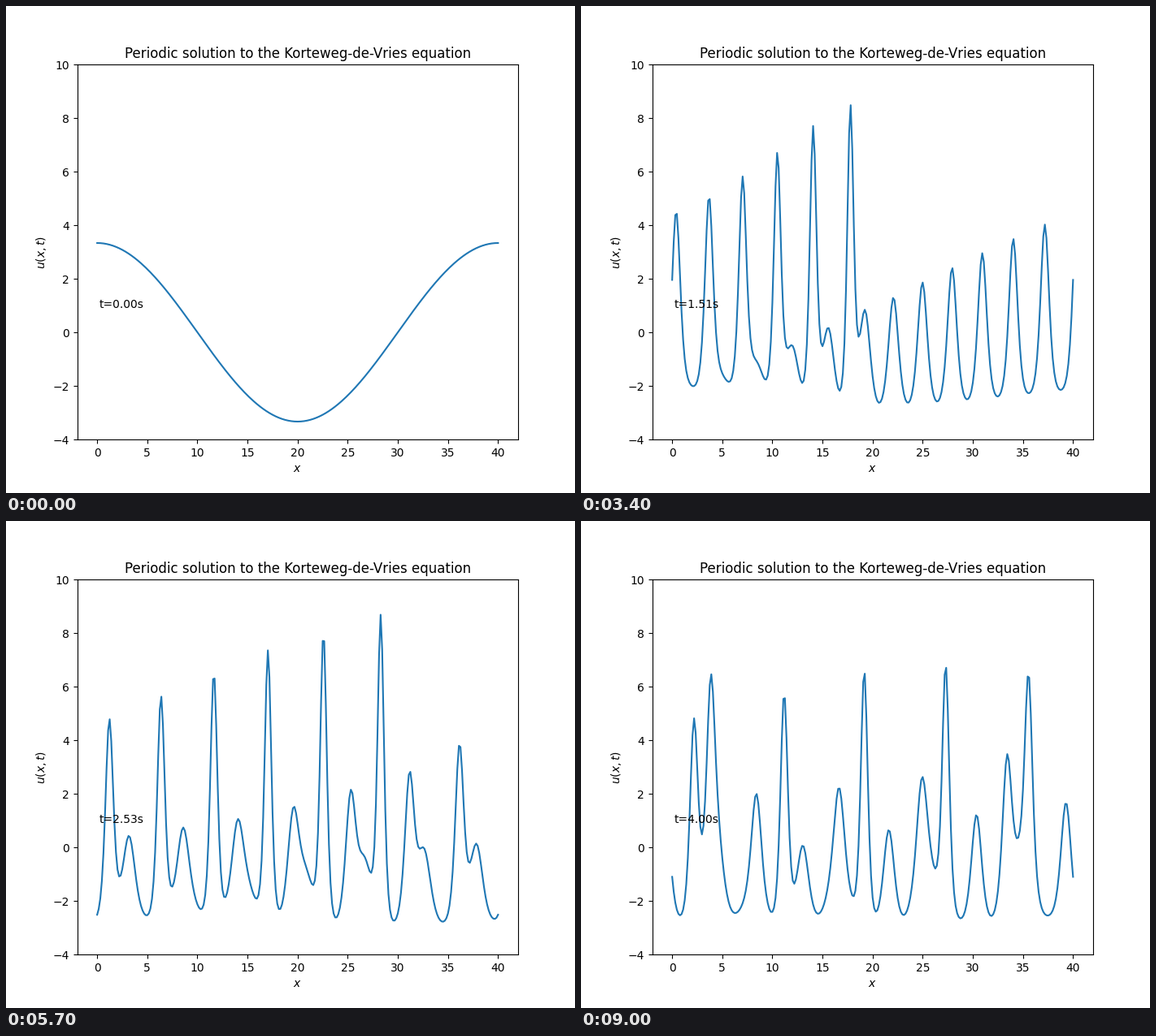
Recreate the animation shown at these times as a matplotlib script. Size 700 by 600 pixels, loop 9.1 s.

```python
import numpy as np
import matplotlib.pyplot as plt
from matplotlib.animation import FuncAnimation

LENGTH = 40.0
POINTS = 256
FRAMES = 91
T_END = 4.0
SUBSTEPS = 100


def solve_kdv(u0, times, substeps):
    """Solve u_t + 6 u u_x + u_xxx = 0 with integrating-factor RK4."""
    n = len(u0)
    k = 2 * np.pi / LENGTH * np.arange(n // 2 + 1)
    dt = (times[1] - times[0]) / substeps
    half = np.exp(0.5j * k**3 * dt)
    full = half**2
    flux = -3j * k * dt

    def advect(v):
        return flux * np.fft.rfft(np.fft.irfft(v, n) ** 2)

    v = np.fft.rfft(u0)
    states = [u0]
    for _ in times[1:]:
        for _ in range(substeps):
            a = advect(v)
            b = advect(half * (v + a / 2))
            c = advect(half * v + b / 2)
            d = advect(full * v + half * c)
            v = full * v + (full * a + 2 * half * (b + c) + d) / 6
        states.append(np.fft.irfft(v, n))
    return np.array(states)


x = np.linspace(0, LENGTH, POINTS + 1)
times = np.linspace(0, T_END, FRAMES)
waves = solve_kdv(10 / 3 * np.cos(2 * np.pi * x[:-1] / LENGTH), times, SUBSTEPS)
waves = np.hstack([waves, waves[:, :1]])

fig, ax = plt.subplots(figsize=(7, 6), dpi=100)
ax.set_title("Periodic solution to the Korteweg-de-Vries equation")
ax.set_xlabel("$x$")
ax.set_ylabel("$u(x,t)$")
ax.set_xlim(-2, 42)
ax.set_ylim(-4, 10)
line, = ax.plot(x, waves[0])
clock = ax.text(0.05, 0.35, "", transform=ax.transAxes)


def update(i):
    line.set_ydata(waves[i])
    clock.set_text(f"t={times[i]:.2f}s")
    return line, clock


anim = FuncAnimation(fig, update, frames=FRAMES, interval=100, repeat=True)
plt.show()
```
